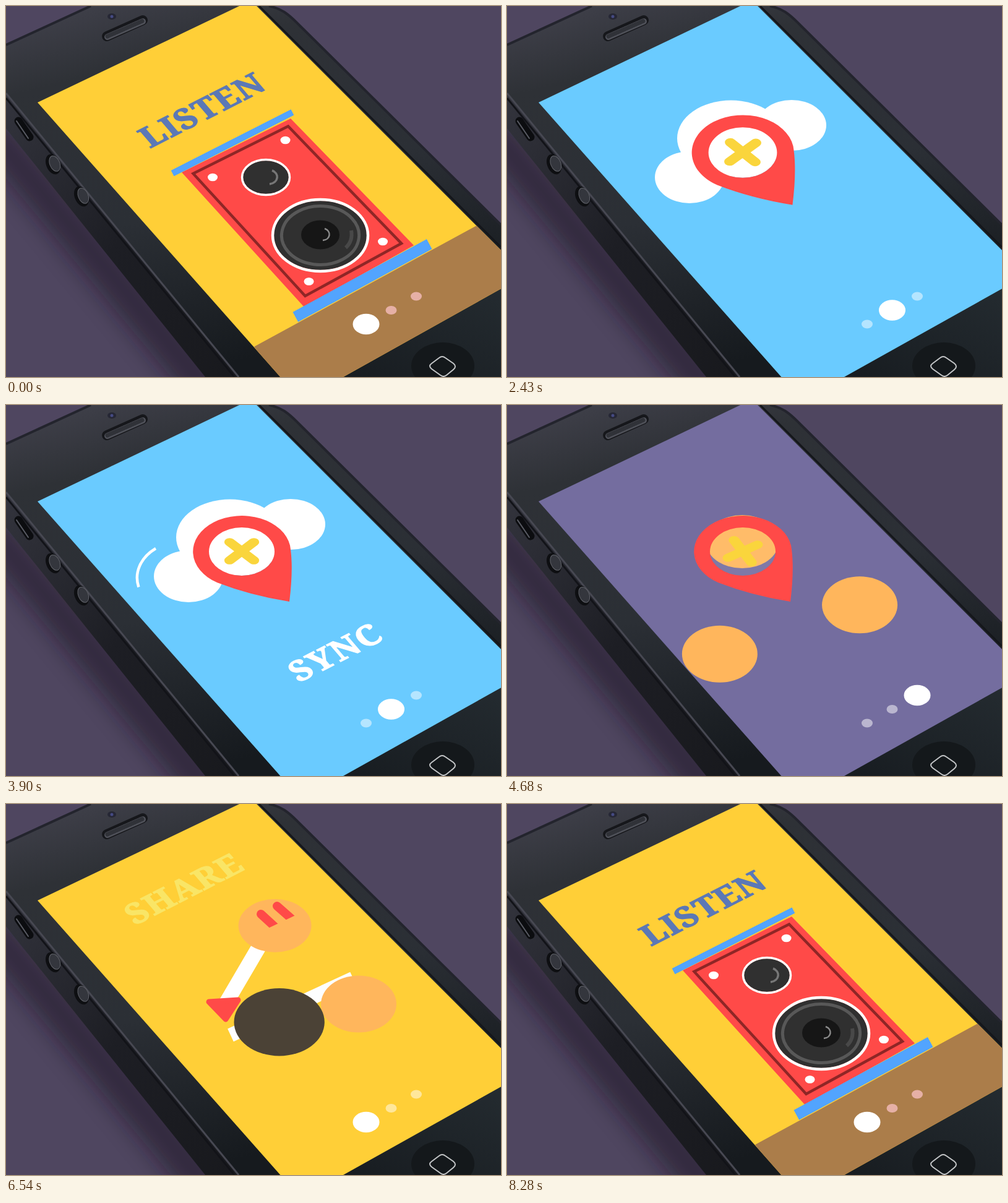
Recreate the animation shown at these times as an HTML page. Size 800 px wide and 600 px high, loop 8310 ms.

```html
<!DOCTYPE html>
<html lang="en">
<head>
<meta charset="utf-8">
<title>Listen, sync, share</title>
<style>
html, body { margin: 0; width: 100%; height: 100%; overflow: hidden; background: #4f4660; }
svg { display: block; width: 800px; height: 600px; }
text { font: 800 50px 'Roboto Slab', 'Noto Serif', serif; text-anchor: middle; }
.line { fill: none; }
</style>
</head>
<body>
<svg id="stage" viewBox="0 0 800 600" xmlns="http://www.w3.org/2000/svg">
  <defs>
    <linearGradient id="face" x1="0" y1="0" x2=".35" y2="1">
      <stop offset="0" stop-color="#43434e"/><stop offset=".22" stop-color="#2e3136"/>
      <stop offset=".6" stop-color="#2b2f35"/><stop offset="1" stop-color="#161a1e"/>
    </linearGradient>
    <linearGradient id="side" x1="0" y1="0" x2="1" y2="1">
      <stop offset="0" stop-color="#33343d"/><stop offset=".5" stop-color="#1d1e24"/><stop offset="1" stop-color="#18191d"/>
    </linearGradient>
    <linearGradient id="chin" x1="0" y1="1" x2="1" y2="0">
      <stop offset="0" stop-color="#14181c"/><stop offset="1" stop-color="#242b30"/>
    </linearGradient>
    <filter id="soft" x="-50%" y="-50%" width="200%" height="200%"><feGaussianBlur stdDeviation="18"/></filter>
    <clipPath id="screen"><path d="M51 156L396 -9L840 435L477 638Z"/></clipPath>
    <clipPath id="wipe"><path id="wipeShape" d="M350 120L500 49L586 149L436 220Z"/></clipPath>
  </defs>

  <rect width="800" height="600" fill="#4f4660"/>
  <path d="M-40 190L0 185L370 620L300 640L-40 230Z" fill="#15101e" opacity=".5" filter="url(#soft)"/>
  <path d="M0 138L385 600H322L0 198Z" fill="url(#side)"/>
  <path d="M0 62L135 0H425C445 4 456 13 470 27L800 354V600H376L0 141Z" fill="url(#face)"/>
  <path class="line" d="M0 63L137 0M425 0C445 4 456 13 470 27L800 354" stroke="#23242d" stroke-width="4"/>
  <path class="line" d="M0 141L376 600" stroke="#474852" stroke-width="3"/>
  <path class="line" d="M0 149L369 600" stroke="#121318" stroke-width="3"/>
  <path class="line" d="M409 0L800 390" stroke="#14161a" stroke-width="3"/>
  <path d="M477 638L545 600L800 457V600Z" fill="url(#chin)"/>
  <path class="line" d="M20 186L38 212" stroke="#0c0d10" stroke-width="13" stroke-linecap="round"/>
  <path class="line" d="M17 186L36 214" stroke="#5a5c64" stroke-width="2" stroke-linecap="round"/>
  <g id="buttons"></g>
  <path class="line" d="M163 49L221 23" stroke="#16171b" stroke-width="16" stroke-linecap="round"/>
  <path class="line" d="M164 50L221 25" stroke="#50525a" stroke-width="10" stroke-linecap="round"/>
  <path class="line" d="M164 49L221 24" stroke="#303238" stroke-width="7" stroke-linecap="round" stroke-dasharray="1 3"/>
  <ellipse cx="171" cy="17" rx="7" ry="5" fill="#262735"/><circle cx="171" cy="17" r="2.5" fill="#454a82"/>
  <ellipse cx="706" cy="582" rx="51" ry="38" fill="#14181b"/>
  <path class="line" d="M688 578L700 569Q705 565 710 569L723 578Q729 583 723 588L712 597Q707 601 702 597L688 587Q682 582 688 578Z" stroke="#c3c5c7" stroke-width="2"/>

  <g clip-path="url(#screen)">
    <rect id="bg" y="-20" width="900" height="720"/>
    <path id="floor" d="M401 551L759 356L900 279V700H500Z" fill="#ab7d4a"/>
    <path id="arcMain" class="line" pathLength="100" d="M257 216A108 75 0 0 1 375 141" stroke="#fff" stroke-width="4.5"/>
    <path id="arcLeft" class="line" pathLength="100" d="M235 322A78 60 0 0 1 242 232" stroke="#fff" stroke-width="4.5"/>
    <g id="body">
      <path d="M284 269L460 182L659 387L482 487Z" fill="#ff4a48"/>
      <path class="line" d="M302.5 271L456 194.5L639 384L483.5 469Z" stroke="#8f2626" stroke-width="4.5"/>
      <g id="screws" fill="#fff"></g>
    </g>
    <g id="bars"></g>
    <g id="discs"></g>
    <g id="rims" class="line" stroke="#fff">
      <ellipse cx="420" cy="277" rx="38.5" ry="28.5" stroke-width="3.5"/>
      <ellipse cx="508" cy="371" rx="77" ry="58" stroke-width="4.5"/>
    </g>
    <path id="ring" class="line" pathLength="100" d="M472.4 332A62 47 0 0 1 543.6 410A62 47 0 0 1 472.4 332" stroke="#585858" stroke-width="5"/>
    <ellipse id="core" cx="508" cy="370" rx="31" ry="23.5" fill="#161616"/>
    <path id="glint" class="line" pathLength="100" d="M512 379C525 378 526 364 515 360" stroke="#8c8c8c" stroke-width="2.5"/>
    <g id="shine" class="line">
      <path d="M426 288C441 286 442 270 430 266" stroke="#777" stroke-width="3.5"/>
      <path d="M549 391Q561 380 558 363" stroke="#484848" stroke-width="6"/>
    </g>
    <g id="pin">
      <ellipse id="hole" cx="381" cy="237" rx="53" ry="39" fill="#fff"/>
      <path fill-rule="evenodd" fill="#ff4a48" d="M458 318Q395 308 341.5 287.2A79 58 0 1 1 459 227Q465 262 458 318ZM328 237A53 39 0 0 0 434 237A53 39 0 0 0 328 237Z"/>
      <path id="cross" class="line" d="M-21 0H21M0 -21V21" stroke="#fad53c" stroke-width="13" stroke-linecap="round"/>
    </g>
    <g fill="#ff4a48" stroke="#ff4a48" stroke-linejoin="round" stroke-linecap="round">
      <path id="play" stroke-width="9" d="M328 320L375 317L355 348Z"/>
      <g clip-path="url(#wipe)"><path id="pause" stroke-width="14" d="M412 178L437 201M438 165L463 187"/></g>
      <path id="skip" stroke-width="8" d="M541 323L576 321L562 345ZM570 308L602 307L591 330Z"/>
    </g>
    <g id="words"></g>
    <g id="dots"></g>
  </g>
</svg>
<script>
const LOOP = 8310;
const NS = 'http://www.w3.org/2000/svg';
const $ = id => document.getElementById(id);
const set = (el, attrs) => { for (const k in attrs) el.setAttribute(k, attrs[k]); };
const add = (parent, tag, attrs = {}) => {
  const el = document.createElementNS(NS, tag);
  set(el, attrs);
  return $(parent).appendChild(el);
};

const clamp = x => Math.min(1, Math.max(0, x));
const span = (t, from, to) => clamp((t - from) / (to - from));
const smooth = x => x * x * (3 - 2 * x);
const ease = (t, from, to) => smooth(span(t, from, to));
const back = x => 1 + 2.4 * (x - 1) ** 3 + 1.4 * (x - 1) ** 2;
const mix = (a, b, k) => a.map((v, i) => v + (b[i] - v) * k);
const rgb = c => `rgb(${c.map(Math.round)})`;

const WHITE = [255, 255, 255], YELLOW = [255, 207, 55], SKY = [106, 203, 255], VIOLET = [116, 109, 159];
const ORANGE = [255, 182, 92], DARK = [48, 48, 48], BLUE = [82, 164, 254], PINK = [230, 176, 166];

// The scenes are 0 listen, 1 sync, 2 share; the changes lead to 1, 2 and back to 0.
const FADES = [1750, 4240, 6050].map(at => ({ at, length: 350, gap: 0 }));
const MOVES = [
  { at: 1720, length: 500, gap: 60 },
  { at: 4250, length: 660, gap: 0 },
  { at: 6321, length: 400, gap: 125 }
];
function change(t, plan, order = 0) {
  const begin = p => p.at + p.gap * order;
  const count = plan.filter(p => t >= begin(p)).length;
  const last = plan[count - 1];
  return {
    from: (count + 2) % 3,
    to: count % 3,
    k: last ? ease(t, begin(last), begin(last) + last.length) : 1
  };
}

// Visibility from 0 to 1; an end before the start lies in the next round.
function shown(t, start, end, rise = 300, fall = 300) {
  const now = t < start ? t + LOOP : t;
  const close = end < start ? end + LOOP : end;
  return ease(now, start, start + rise) * (1 - ease(now, close, close + fall));
}

// Centres and radii per scene; bow bends the way from sync to share.
const discs = [
  { at: [[420, 277], [362, 214], [437, 183.5]], size: [[37, 27], [87, 61.5], [59, 43]], fill: [DARK, WHITE, ORANGE], bow: [-47, 38], order: 1 },
  { at: [[460, 193], [460, 193], [570, 323.5]], size: [[0, 0], [56, 41], [61, 46]], fill: [ORANGE, WHITE, ORANGE], bow: [40, 47], order: 2 },
  { at: [[508, 371], [295, 277], [352, 328]], size: [[75, 56], [56, 42], [61, 46]], fill: [DARK, WHITE, ORANGE], bow: [10, 116], order: 0 }
].map(disc => ({ ...disc, el: add('discs', 'ellipse') }));

function drawDisc({ el, at, size, fill, bow, order }, t) {
  const { from, to, k } = change(t, MOVES, order);
  const early = ease(k, .15, .7);
  const bend = to === 2 ? Math.sin(Math.PI * k) : 0;
  const [cx, cy] = mix(at[from], at[to], k).map((v, i) => v + bow[i] * bend);
  const [rx, ry] = mix(size[from], size[to], early);
  set(el, { cx, cy, rx, ry, fill: rgb(mix(fill[from], fill[to], early)) });
}

// Share links turn into the speaker's caps: first the angle, then the rest.
const bars = [
  { link: [394.5, 255.5, 168, 24], cap: [366, 221.2, 217.6, 10.5], angles: [-59.6, -27], order: 2 },
  { link: [461, 327, 218, 23], cap: [576, 444, 246.5, 18], angles: [0, -28.6], order: 0 }
].map(bar => ({ ...bar, el: add('bars', 'rect', { x: -.5, y: -.5, width: 1, height: 1 }) }));

function drawBar({ el, link, cap, angles, order }, t) {
  const k = t < 4000 ? 1 : change(t, MOVES, order).to === 0 ? change(t, MOVES, order).k : 0;
  const late = ease(k, .55, 1);
  const [x, y, length, width] = mix(link, cap, late);
  const angle = angles[0] + (angles[1] - angles[0]) * ease(k, .15, .7);
  set(el, {
    transform: `translate(${x} ${y}) rotate(${angle}) scale(${length * shown(t, 5000, 1720)} ${width})`,
    fill: rgb(mix(WHITE, BLUE, late))
  });
}

const pen = document.createElement('canvas').getContext('2d');
pen.font = "800 50px 'Roboto Slab', 'Noto Serif', serif";

// Letters laid along the tilted baseline, centred on (x, y).
function word(text, x, y, fill, motion) {
  const widths = [...text].map(c => pen.measureText(c).width + 1.5);
  let pos = -widths.reduce((a, b) => a + b) / 2;
  const letters = widths.map((w, i) => {
    const mid = pos + w / 2;
    pos += w;
    const el = add('words', 'text', { fill, stroke: fill, 'stroke-width': 1.4 });
    el.textContent = text[i];
    return { el, x: x + mid * .98, y: y - mid * .5 };
  });
  return { letters, ...motion };
}
const words = [
  word('LISTEN', 328, 182, '#5b78b6', { from: [-75, -80], start: 6900, step: 110, length: 300, end: 1720 }),
  word('SYNC', 543, 414, '#fff', { from: [116, 142], start: 2900, step: 150, length: 220, end: 4240 }),
  word('SHARE', 298, 151, '#f9e566', { from: [-46, -52], start: 4880, step: 100, length: 300, end: 6550 })
];
function drawWord({ letters, from, start, step, length, end }, t) {
  letters.forEach(({ el, x, y }, i) => {
    const begin = start + i * step;
    const left = 1 - shown(t, begin, end, length, 1e6);
    set(el, {
      transform: `matrix(.98 -.5 .65 .76 ${x + from[0] * left} ${y + from[1] * left})`,
      opacity: shown(t, begin, end, 1)
    });
  });
}

for (const [x, y] of [[76, 256], [122, 308]]) {
  const transform = `rotate(-22 ${x} ${y})`;
  add('buttons', 'ellipse', { cx: x, cy: y, rx: 11, ry: 17, fill: '#0e0f12', transform });
  add('buttons', 'ellipse', { cx: x + 3, cy: y, rx: 8, ry: 13, fill: '#34363d', stroke: '#62646b', transform });
}
for (const [cx, cy] of [[334, 277], [451.5, 217], [609, 381], [489.5, 445.5]])
  add('screws', 'ellipse', { cx, cy, rx: 8, ry: 6.3 });
const dots = [0, 1, 2].map(i => add('dots', 'ellipse', { cx: 582 + 40.5 * i, cy: 514.5 - 22.5 * i }));

const zoom = (id, x, y, s) => set($(id), { transform: `translate(${x} ${y}) scale(${s}) translate(${-x} ${-y})` });
const fade = (id, opacity) => set($(id), { opacity });
const trim = (id, begin, end) => set($(id), {
  'stroke-dasharray': `0 ${begin * 100} ${Math.max(0, end - begin) * 100} 300`,
  opacity: end > begin ? 1 : 0
});
const sweep = (id, t, start) => trim(id, ease(t, start + 400, start + 800), ease(t, start, start + 320));
const pop = (t, start, out, fall = 200) => t < out ? Math.max(0, back(span(t, start, start + 300))) : 1 - ease(t, out, out + fall);

function draw(t) {
  const { from, to, k } = change(t, FADES);
  const backdrops = [YELLOW, SKY, VIOLET];
  const floor = shown(t, 6700, 1720, 400, 380);
  set($('bg'), { fill: rgb(mix(backdrops[from], backdrops[to], k)) });
  set($('floor'), { transform: `translate(${(1 - floor) * 190} ${(1 - floor) * 215})` });

  zoom('body', 471, 335, shown(t, 6680, 1720, 370));
  bars.forEach(bar => drawBar(bar, t));
  discs.forEach(disc => drawDisc(disc, t));

  fade('rims', shown(t, 6800, 1700, 150, 100));
  zoom('core', 508, 370, shown(t, 7050, 1700, 250, 150));
  fade('shine', shown(t, 7300, 1680, 200, 100));
  const outline = shown(t, 7590, 900, 610, 740);
  trim('ring', 0, outline);
  trim('glint', 0, outline ? Math.max(outline, .07) : 0);

  sweep('arcMain', t, 2780);
  sweep('arcLeft', t, 3350);

  zoom('pin', 381, 237, pop(t, 2200, 4700));
  fade('hole', 1 - span(t, 4240, 4720));
  const turn = 45 + 90 * (ease(t, 2400, 2800) - 1 + ease(t, 4600, 4920));
  set($('cross'), { transform: `translate(381 236.5) scale(1.32 1) rotate(${turn})` });

  zoom('play', 353, 328, pop(t, 5120, 6580, 140));
  zoom('pause', 437, 183, pop(t, 5220, 6720, 1));
  zoom('skip', 571, 325, pop(t, 5320, 6300));
  const wipe = -60 * span(t, 6440, 6700);
  set($('wipeShape'), { transform: `translate(${wipe * .65} ${wipe * .76})` });

  words.forEach(w => drawWord(w, t));

  const tints = backdrops.map(c => mix(c, WHITE, .5));
  const faint = mix(mix(tints[from], tints[to], k), PINK, floor);
  dots.forEach((dot, i) => {
    const active = (from === i) * (1 - k) + (to === i) * k;
    set(dot, { rx: 9 + 12.5 * active, ry: 7 + 9.7 * active, fill: rgb(mix(faint, WHITE, active)) });
  });
}

const origin = performance.now();
function frame() {
  draw((performance.now() - origin) % LOOP);
  requestAnimationFrame(frame);
}
frame();
</script>
</body>
</html>
```
